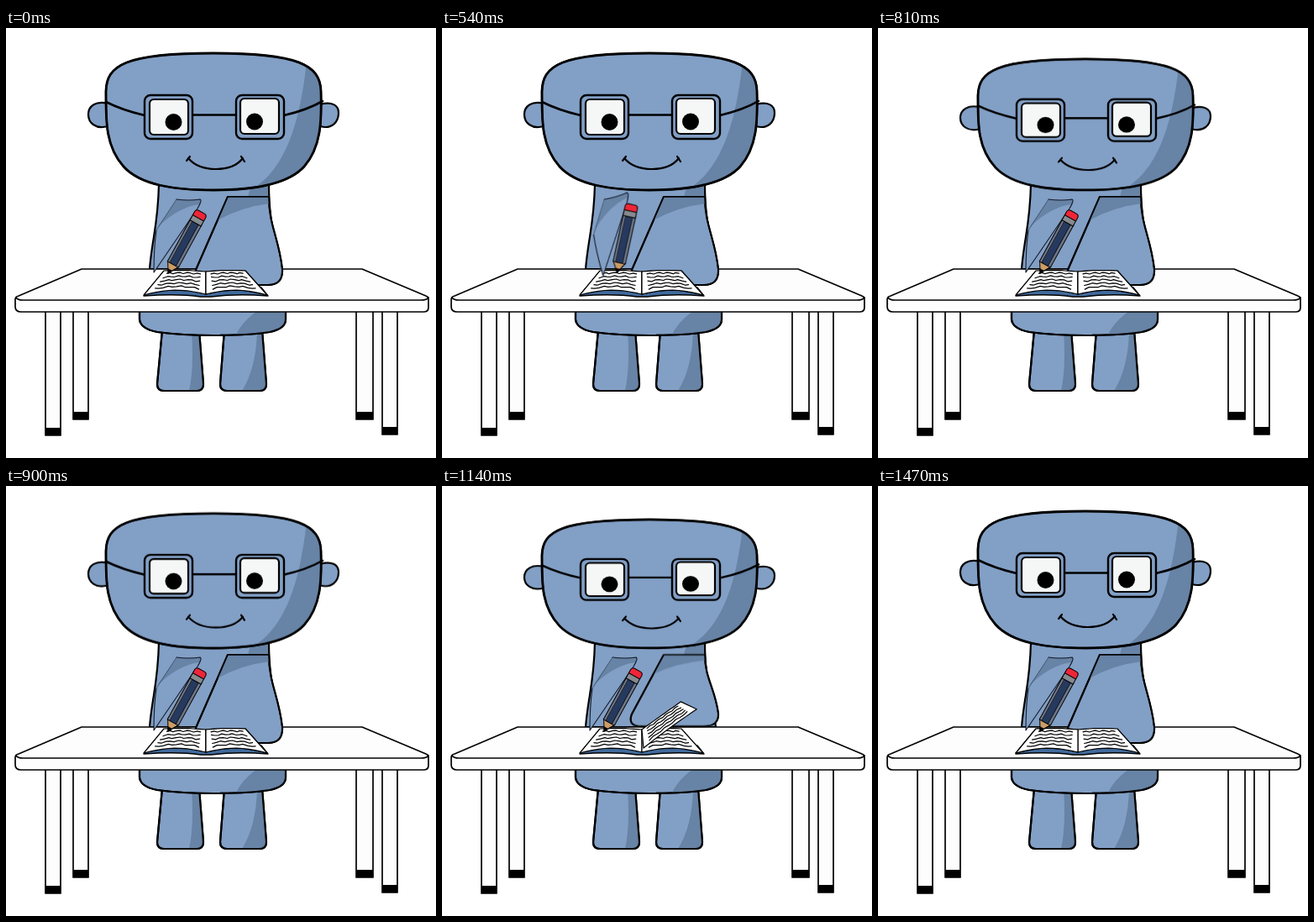
Recreate the animation shown at these times as an HTML page. Size 512 px wide and 512 px high, loop 1.65 s.

```html
<!DOCTYPE html>
<html lang="en">
<head>
<meta charset="utf-8">
<title>Writing at a desk</title>
<style>
  html, body { margin: 0; width: 100%; height: 100%; overflow: hidden; background: #fff; }
  svg { display: block; width: 100vw; height: 100vh; }
  .skin { fill: #829fc5; }
  .shade { fill: #6783a5; stroke: none; }
  .white { fill: #fdfdfd; }
  .lens { fill: #f5f7f6; }
  .line { fill: none; }
  .thin { stroke-width: 1.1; }
  .ink { fill: #000; stroke: none; }

  #head, #hand, #arm { animation: 1650ms linear infinite; }
  #head { transform-origin: 247px 193px; animation-name: nod; }
  #hand { transform-origin: 198px 238px; animation-name: write; }
  #arm { transform-origin: 290px 201px; animation-name: lift; }

  @keyframes nod {
    0%, 32.727% { transform: scaleY(1); animation-timing-function: ease-in-out; }
    47.273% { transform: scaleY(.955); animation-timing-function: ease-in-out; }
    60% { transform: scaleY(1); }
    61.818% { transform: scaleY(.993); }
    69.091% { transform: scaleY(.939); animation-timing-function: ease-out; }
    74.545% { transform: scaleY(.925); animation-timing-function: ease-in-out; }
    89.091%, 100% { transform: scaleY(1); }
  }
  @keyframes write {
    0% { transform: rotate(0); }
    14.545% { transform: rotate(-19deg); animation-timing-function: ease-out; }
    23.636% { transform: rotate(-22deg); animation-timing-function: ease-in; }
    32.727% { transform: rotate(-16.5deg); animation-timing-function: ease-out; }
    47.273%, 100% { transform: rotate(0); }
  }
  @keyframes lift {
    0%, 60% { transform: scaleY(1); }
    61.818% { transform: scaleY(.965); }
    69.091% { transform: scaleY(.81); animation-timing-function: ease-out; }
    74.545% { transform: scaleY(.78); animation-timing-function: ease-in-out; }
    89.091%, 100% { transform: scaleY(1); }
  }
</style>
</head>
<body>
<svg viewBox="0 0 512 512" stroke="#000" stroke-width="2.2" stroke-linejoin="round" stroke-linecap="round">
  <defs>
    <path id="skull" d="M119 75C120 45 140 30 247 30C348 30 374 44 375 75C376 112 375 142 355 165C335 187 292 193 247 193C200 193 160 187 140 165C118 140 119 110 119 75Z"/>
    <path id="sleeve" d="M264 201H313C313 235 325 250 329 287Q330 306 312 306H234Q221 304 226 288Z"/>
    <path id="hips" d="M159 330V347Q160 358 180 362Q210 366 247 366Q290 366 314 362Q333 358 333 347V330Z"/>
    <path id="leftLeg" d="M186 360L180 424Q180 432 188 432H227Q235 432 235 424L230 360Z"/>
    <path id="rightLeg" d="M260 360L255 424Q255 432 263 432H302Q310 432 310 424L305 360Z"/>
    <clipPath id="skullClip"><use href="#skull"/></clipPath>
    <clipPath id="sleeveClip"><use href="#sleeve"/></clipPath>
    <clipPath id="hipsClip"><use href="#hips"/></clipPath>
    <clipPath id="legClip"><use href="#leftLeg"/><use href="#rightLeg"/></clipPath>
  </defs>

  <!-- legs and hips -->
  <use href="#leftLeg" class="skin"/>
  <use href="#rightLeg" class="skin"/>
  <path class="shade" clip-path="url(#legClip)" d="M221 360Q224 405 218 432H238V360ZM299 360Q298 405 281 432H312V360Z"/>
  <use href="#leftLeg" class="line"/>
  <use href="#rightLeg" class="line"/>
  <use href="#hips" class="skin"/>
  <path class="shade" clip-path="url(#hipsClip)" d="M312 330Q284 343 273 367H335V330Z"/>
  <use href="#hips" class="line"/>

  <!-- torso -->
  <path class="skin" d="M182 186C181 235 174 250 171 287H326C322 250 313 235 313 186Z"/>
  <path class="shade" d="M292 186H312V201H288Z"/>

  <!-- table -->
  <g class="white" stroke-width="1.7">
    <path d="M80 336V466H98V336M417 336V466H437V336M47 336V485H65V336M448 336V484H466V336"/>
    <path class="ink" d="M80 457H98V466H80ZM417 457H437V466H417ZM47 476H65V485H47ZM448 475H466V484H448Z"/>
    <path d="M90 287H424L500 319Q503 320 503 323V333Q503 338 497 338H18Q11 338 11 332V323Q11 320 15 319Z"/>
    <path class="line" d="M12 321Q14 324 20 324H494Q501 324 503 321"/>
  </g>

  <!-- resting arm -->
  <g id="arm">
    <use href="#sleeve" class="skin"/>
    <path class="shade" clip-path="url(#sleeveClip)" d="M264 201H314V209Q280 213 252 229Z"/>
    <use href="#sleeve" class="line" stroke-width="1.7"/>
  </g>

  <!-- book -->
  <path d="M171 310L164 319Q205 316 232 320H244Q275 316 312 319L304 309Z" fill="#416a9c" stroke-width="1.4"/>
  <g id="book"></g>

  <!-- writing hand -->
  <g id="hand">
    <path class="skin" stroke="none" d="M176 291Q176 262 179 241L203 204Q218 206 231 204Q234 205 228 215Z"/>
    <path class="shade" d="M179 239L203 204Q218 206 231 204Q232 207 230 210Q203 214 179 239Z"/>
    <path class="line thin" d="M203 204Q218 206 231 204Q234 205 228 215L176 291Q176 262 179 241" stroke="#111827"/>
    <path class="line" stroke-width=".7" stroke="#33475f" d="M179 241L203 204"/>
    <g transform="translate(193 292) rotate(28.7)" stroke-width="1">
      <path fill="#cb9c66" d="M0 0L-7.5 -13H7.5Z"/>
      <path class="ink" d="M0 1L-3.2 -5H3.2Z"/>
      <path fill="#6d7687" d="M-7.5 -12H7.5V-70H-7.5Z"/>
      <path fill="#263a60" stroke-width=".7" d="M-4 -12H4V-69H-4Z"/>
      <path fill="#858a90" d="M-7.5 -68H7.5V-75H-7.5Z"/>
      <path fill="#ed2638" d="M-7.5 -75H7.5V-80Q7 -83 4 -83H-4Q-7 -83 -7.5 -80Z"/>
    </g>
  </g>

  <!-- head -->
  <g id="head">
    <path class="skin" d="M122 90C107 86 98 93 98 103C98 113 107 121 121 117Z"/>
    <path class="skin" d="M374 91C388 87 396 92 396 101C396 112 388 121 374 117Z"/>
    <use href="#skull" class="skin"/>
    <path class="shade" clip-path="url(#skullClip)" d="M358 40C352 92 340 168 289 194H380V40Z"/>
    <use href="#skull" class="line" stroke-width="2.8"/>
    <path class="line" stroke-width="2.6" d="M222 103.500H274M165 104Q139 98 119 88M331 104Q358 98 377 87"/>
    <g class="skin" stroke-width="2.4">
      <rect x="165" y="80" width="57" height="52" rx="7"/>
      <rect x="274" y="80" width="57" height="52" rx="7"/>
    </g>
    <g class="lens">
      <rect x="171" y="85" width="46" height="42" rx="5"/>
      <rect x="279" y="84" width="46" height="42" rx="5"/>
    </g>
    <circle class="ink" cx="199.500" cy="112" r="10"/>
    <circle class="ink" cx="296" cy="111.500" r="10"/>
    <path class="line" d="M217 155Q228 168 250 168Q272 168 282 155M215 158L219 153M280 153L284 159"/>
  </g>
</svg>
<script>
  const book = document.getElementById('book');
  const steps = [0, 1, 2, 3, 4, 5, 6, 7, 8, 9, 10].map(i => i / 10);
  const wobble = (u, row) => .035 * Math.sin(u * 41 + row * 5);

  // Sheet: spine top, outer top, outer bottom, spine bottom, curl height
  function point([a, b, c, d, curl], u, v) {
    const mix = i => (1 - v) * ((1 - u) * a[i] + u * b[i]) + v * ((1 - u) * d[i] + u * c[i]);
    const y = mix(1) - curl * (.2 + v) * Math.sin(Math.PI * u);
    return mix(0).toFixed(1) + ' ' + y.toFixed(1);
  }

  const edge = sheet => 'M' + steps.map(u => point(sheet, u, 0))
    .concat(steps.slice().reverse().map(u => point(sheet, u, 1))).join('L') + 'Z';

  const text = sheet => [.13, .3, .47, .64, .81].map((v, row) =>
    'M' + steps.map(u => point(sheet, .12 + u * .76, v + wobble(u, row))).join('L')).join('');

  function addPath(d, width, fill) {
    const el = document.createElementNS('http://www.w3.org/2000/svg', 'path');
    el.setAttribute('d', d);
    el.setAttribute('stroke-width', width);
    el.setAttribute('fill', fill);
    return book.appendChild(el);
  }

  const addSheet = sheet => [addPath(edge(sheet), 1.2, '#fff'), addPath(text(sheet), 1.2, 'none')];

  const spineTop = [238, 290], spineFoot = [238, 317];
  const right = [spineTop, [285, 289], [311, 318], spineFoot, 4.5];
  const left = [spineTop, [188, 289], [164, 318], spineFoot, 4.5];
  const turn = [
    [0, right],
    [990, right],
    [1020, [spineTop, [284, 285], [309, 314], spineFoot, 4]],
    [1140, [spineTop, [285, 257], [304, 266], [240, 312], 1]],
    [1230, [spineTop, [238, 244], [237, 251], [239, 313], 0]],
    [1320, [spineTop, [196, 258], [176, 269], [238, 313], 1]],
    [1470, left],
    [1650, left]
  ];

  addSheet(left);
  addSheet(right);
  const [page, words] = addSheet(right);
  const play = (el, shape) => el.animate(
    turn.map(([t, sheet]) => ({ offset: t / 1650, d: `path("${shape(sheet)}")` })),
    { duration: 1650, iterations: Infinity });
  play(page, edge);
  play(words, text);
</script>
</body>
</html>
```
